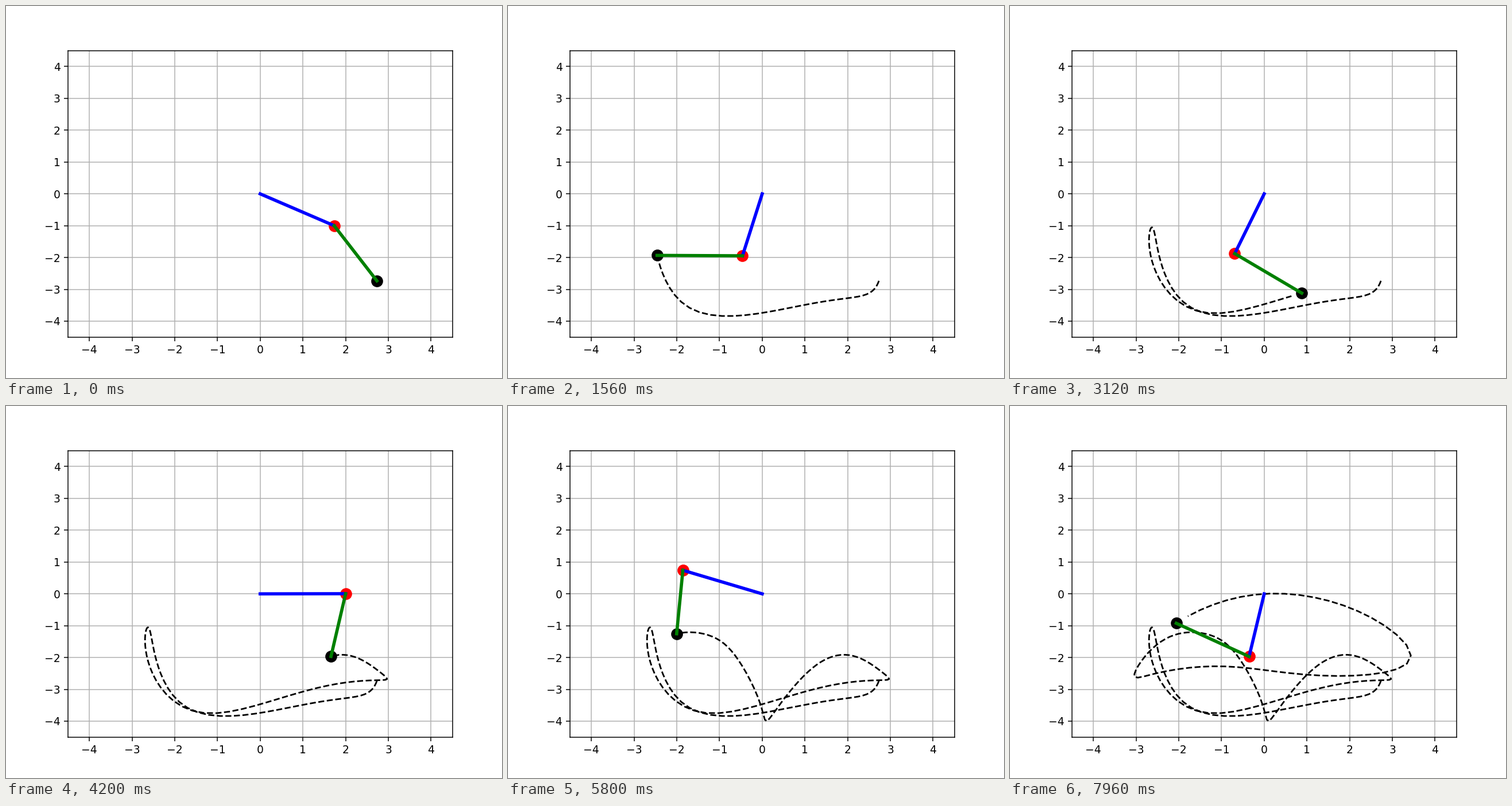
These frames come from a looping animation (864 by 648 pixels, 8000 ms). A matplotlib script:

```python
import numpy as np
import matplotlib.pyplot as plt
from matplotlib.animation import FuncAnimation

G = 9.81
M1 = M2 = 1.0
L1 = L2 = 2.0
DT = 0.04
FRAMES = 200


def accelerations(a1, a2, w1, w2):
    """Angular accelerations of a double pendulum."""
    d = a1 - a2
    den = 2 * M1 + M2 - M2 * np.cos(2 * d)
    acc1 = (-G * (2 * M1 + M2) * np.sin(a1)
            - M2 * G * np.sin(a1 - 2 * a2)
            - 2 * np.sin(d) * M2 * (w2**2 * L2 + w1**2 * L1 * np.cos(d))
            ) / (L1 * den)
    acc2 = 2 * np.sin(d) * (w1**2 * L1 * (M1 + M2)
                            + G * (M1 + M2) * np.cos(a1)
                            + w2**2 * L2 * M2 * np.cos(d)) / (L2 * den)
    return np.array([acc1, acc2])


def simulate():
    """Explicit Euler steps from rest; its energy gain shapes the motion."""
    angles = np.zeros((FRAMES, 2))
    angles[0] = np.radians([60, 30])
    speed = np.zeros(2)
    for i in range(FRAMES - 1):
        acc = accelerations(*angles[i], *speed)
        angles[i + 1] = angles[i] + DT * speed
        speed = speed + DT * acc
    return angles.T


a1, a2 = simulate()
x1, y1 = L1 * np.sin(a1), -L1 * np.cos(a1)
x2, y2 = x1 + L2 * np.sin(a2), y1 - L2 * np.cos(a2)

fig, ax = plt.subplots(figsize=(6.4, 4.8), dpi=135)
ax.set_xlim(-4.5, 4.5)
ax.set_ylim(-4.5, 4.5)
ax.grid(True)

trail, = ax.plot([], [], "k--")
bob1, = ax.plot([], [], "o", color="red", markersize=10)
bob2, = ax.plot([], [], "o", color="black", markersize=10)
rod1, = ax.plot([], [], color="blue", lw=3)
rod2, = ax.plot([], [], color="green", lw=3)


def update(i):
    trail.set_data(x2[:i], y2[:i])
    bob1.set_data([x1[i]], [y1[i]])
    bob2.set_data([x2[i]], [y2[i]])
    rod1.set_data([0, x1[i]], [0, y1[i]])
    rod2.set_data([x1[i], x2[i]], [y1[i], y2[i]])
    return trail, bob1, bob2, rod1, rod2


anim = FuncAnimation(fig, update, frames=FRAMES, interval=DT * 1000,
                     repeat=True, repeat_delay=0)
plt.show()
```
